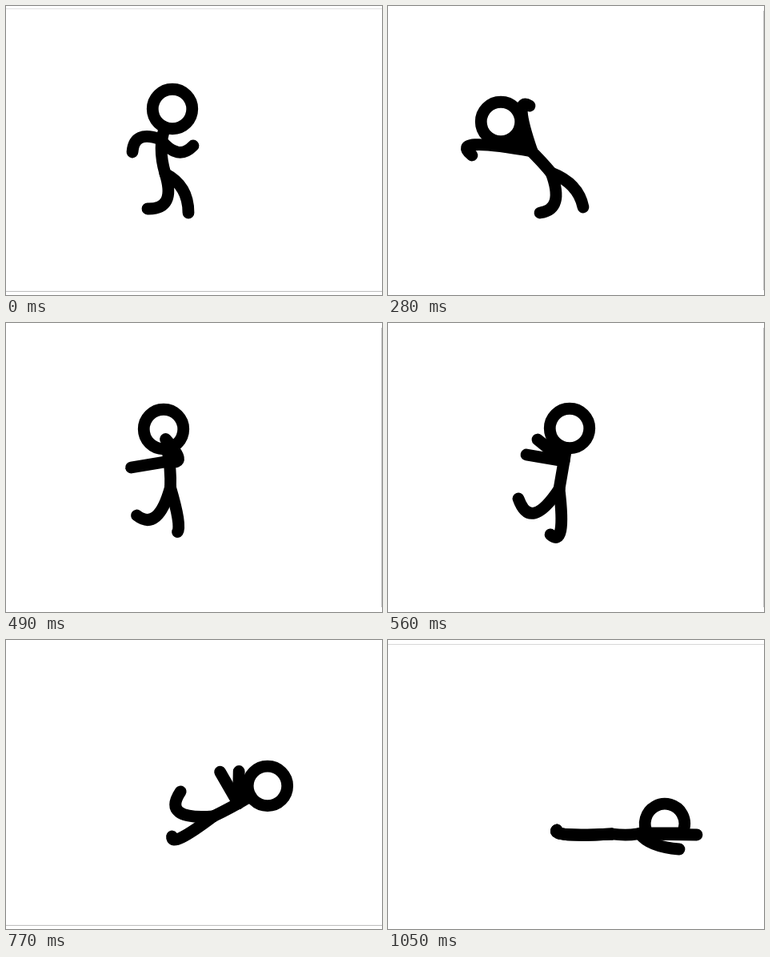
Recreate the animation shown at these times as an HTML page with a canvas. Size 470x362 px, loop 1.26 s.

```html
<!DOCTYPE html>
<html lang="en">
<head>
<meta charset="utf-8">
<title>Stick figure fall</title>
<style>
  html, body { margin: 0; width: 100%; height: 100%; overflow: hidden; background: #fff; }
  canvas { display: block; width: 470px; height: 362px; }
</style>
</head>
<body>
<canvas id="stage" width="470" height="362"></canvas>
<script>
const ctx = document.getElementById("stage").getContext("2d");
const STEP = 70, LAST = 15, LOOP = 1260;
const FLOOR = 242, HEAD_R = 24.75;

const mix = (a, b, t) => a.map((v, i) => v + (b[i] - v) * t);
const blend = (from, to, t) => from.map((point, i) => mix(point, to[i], t));

// Limbs are [tip, bend], two arms and then two legs; without a bend they are straight.
function pose(head, shoulder, hip, ...limbs) {
  const joints = limbs.flatMap(([tip, bend], i) =>
    [bend || mix(i < 2 ? shoulder : hip, tip, 0.5), tip]);
  return [head, shoulder, hip, ...joints];
}

const ready = pose([208, 129], [193, 167], [199, 210],
  [[158, 183], [160, 155]], [[234, 175], [215, 195]],
  [[177, 254], [213, 255]], [[228, 259], [228, 225]]);
const wound = pose([141, 145], [180, 182], [204, 209],
  [[105, 187], [75, 163]], [[177, 125], [156, 112]],
  [[190, 259], [221, 255]], [[244, 252], [238, 222]]);
const swing = pose([167, 134], [189, 173], [197, 204],
  [[140, 197]], [[212, 145], [254, 198]],
  [[164, 262], [202, 261]], [[226, 258], [216, 225]]);
const struck = pose([227, 132], [220, 173], [214, 208],
  [[173, 165]], [[187, 146]],
  [[163, 220], [178, 262]], [[203, 265], [223, 283]]);
const lying = pose([346, 230], [315, 243], [280, 243],
  [[364, 262], [327, 259]], [[386, 244]],
  [[211, 238], [204, 247]], [[211, 238], [204, 247]]);

// The struck body topples stiffly about its sliding foot, then gives a little on landing.
function topple(p) {
  const turn = p ** 0.85;
  const angle = turn * 80 * Math.PI / 180;
  const cos = Math.cos(angle), sin = Math.sin(angle);
  const foot = struck[struck.length - 1];
  const [footX, footY] = mix(foot, [210, 236], turn);
  const give = 1 - 0.25 * p ** 3;
  const ground = 290 + (FLOOR - 290) * p;
  return struck.map(([px, py], i) => {
    const dx = px - foot[0], dy = py - foot[1];
    const x = footX + dx * cos - dy * sin;
    const y = footY + dx * sin + dy * cos;
    if (i === 0) return [x, Math.min(y, FLOOR - 15)];
    return [x, Math.min(ground, FLOOR + (y - FLOOR) * give)];
  });
}

function poseAt(step) {
  if (step < 4) return blend(ready, wound, step / 4);
  if (step < 6) return blend(wound, swing, (step - 4) / 2);
  if (step < 8) return blend(swing, struck, (step - 6) / 2);
  if (step < 13) return topple((step - 8) / 5);
  return blend(topple(1), lying, (step - 13) / 2);
}

function curve(from, bend, to) {
  ctx.beginPath();
  ctx.moveTo(...from);
  ctx.quadraticCurveTo(...bend, ...to);
  ctx.stroke();
}

// A ring, cut flat where it meets the floor.
function drawHead([x, y]) {
  const cut = Math.asin(Math.min(1, (FLOOR - y) / HEAD_R));
  ctx.beginPath();
  ctx.arc(x, y, HEAD_R, Math.PI - cut, Math.PI * 2 + cut);
  ctx.closePath();
  ctx.stroke();
}

function drawFigure([head, shoulder, hip, ...joints]) {
  ctx.strokeStyle = "#000";
  ctx.lineCap = ctx.lineJoin = "round";
  ctx.lineWidth = 14.8;
  drawHead(head);
  const reach = Math.hypot(shoulder[0] - head[0], shoulder[1] - head[1]);
  curve(mix(head, shoulder, HEAD_R / reach), mix(head, shoulder, 1.25), hip);
  for (let i = 0; i < joints.length; i += 2) {
    curve(i < 4 ? shoulder : hip, joints[i], joints[i + 1]);
  }
}

// Thin paper edges that flicker as the sheets change.
function drawEdges(step) {
  const line = (color, ...box) => { ctx.fillStyle = color; ctx.fillRect(...box); };
  const falling = step > 9 && step < 13;
  if (step === 0) line("#e2e2e2", 0, 3, 470, 1);
  if (step >= 13) line("#d8d8d8", 0, 5, 470, 1);
  if (step === 0 || falling) line("#bdbdbd", 0, 357, 470, 1);
  else if (step < LAST) line("#c6c6c6", 469, 6, 1, 350);
}

const start = performance.now();

function frame() {
  const time = (performance.now() - start) % LOOP;
  const step = Math.min(LAST, Math.floor(time / STEP));
  ctx.fillStyle = "#fff";
  ctx.fillRect(0, 0, 470, 362);
  drawEdges(step);
  drawFigure(poseAt(step));
  requestAnimationFrame(frame);
}
frame();
</script>
</body>
</html>
```
